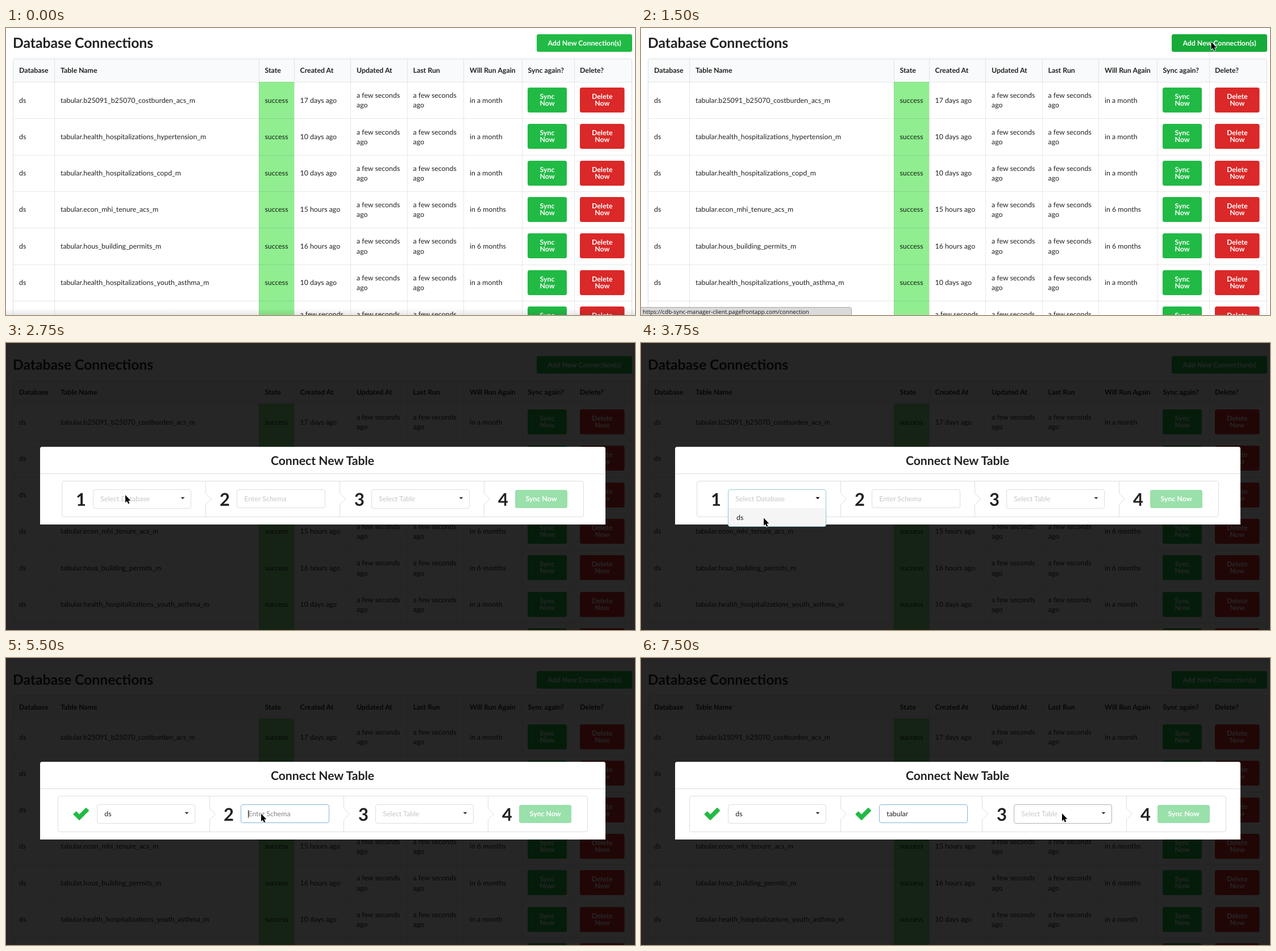
An HTML page with a canvas for the animation above (8000 ms loop, 1107 by 506 pixels).

```html
<!DOCTYPE html>
<html lang="en">
<head>
<meta charset="utf-8">
<title>Database Connections</title>
<style>
  html, body { margin: 0; width: 100%; height: 100%; overflow: hidden; background: #fff; }
  canvas { display: block; }
</style>
</head>
<body>
<canvas id="stage" width="1107" height="506"></canvas>
<script>
const W = 1107, H = 506, LOOP = 8000;
const ctx = document.getElementById('stage').getContext('2d');
ctx.textRendering = 'geometricPrecision';

const SIZE = 12.35;
const INK = 'rgba(0,0,0,.87)', PLACEHOLDER = 'rgba(191,191,191,.87)';
const BORDER = 'rgba(34,36,38,.15)', RULE = 'rgba(34,36,38,.1)', HOVER = 'rgba(34,36,38,.35)';
const GREEN = '#21ba45', RED = '#db2828', OPEN = '#96c8da', FOCUS = '#85b7d9';

const COLUMNS = [
  ['Database', 23], ['Table Name', 96], ['State', 455.5], ['Created At', 517.5], ['Updated At', 617],
  ['Last Run', 716.5], ['Will Run Again', 816], ['Sync again?', 918.5], ['Delete?', 1010]
];
const RECENT = 'a few seconds';
const ROWS = [
  ['b25091_b25070_costburden_acs_m', '17 days ago', 'in a month'],
  ['health_hospitalizations_hypertension_m', '10 days ago', 'in a month'],
  ['health_hospitalizations_copd_m', '10 days ago', 'in a month'],
  ['econ_mhi_tenure_acs_m', '15 hours ago', 'in 6 months'],
  ['hous_building_permits_m', '16 hours ago', 'in 6 months'],
  ['health_hospitalizations_youth_asthma_m', '10 days ago', 'in a month'],
  ['', RECENT, '']
];

// Each entry holds from its time until the next: [ms, ...values]
const POINTER = [
  [250, 928, 60], [500, 1004, 56], [750, 1008, 40], [1250, 1018, 23], [1500, 1003.5, 24.5],
  [2500, 238, 254], [2750, 210, 268], [3000, 216, 273], [3500, 216, 323], [3750, 216, 308.5],
  [5000, 449, 274.5], [7000, 735, 278], [7250, 741, 274]
];
const TYPED = [[0, ''], [6000, 't'], [6250, 'tab'], [6500, 'tabula'], [6750, 'tabular']];
const at = (keys, t) => keys.filter(k => k[0] <= t).pop();

function text(str, x, y, { size = SIZE, bold = false, color = INK, align = 'left', family = 'Lato' } = {}) {
  ctx.font = `${bold ? 700 : 400} ${size}px ${family}, sans-serif`;
  ctx.fillStyle = color;
  ctx.textAlign = align;
  ctx.fillText(str, x, y);
}

function box(x, y, w, h, r, fill, stroke) {
  ctx.beginPath();
  ctx.roundRect(x, y, w, h, r);
  if (fill) { ctx.fillStyle = fill; ctx.fill(); }
  if (stroke) { ctx.strokeStyle = stroke; ctx.lineWidth = 1; ctx.stroke(); }
}

function poly(points, { fill, stroke, width = 1, close = true }) {
  ctx.beginPath();
  points.forEach(([x, y]) => ctx.lineTo(x, y));
  if (close) ctx.closePath();
  ctx.lineJoin = 'round';
  if (stroke) { ctx.strokeStyle = stroke; ctx.lineWidth = width; ctx.stroke(); }
  if (fill) { ctx.fillStyle = fill; ctx.fill(); }
}

function rect(x, y, w, h, fill) {
  ctx.fillStyle = fill;
  ctx.fillRect(x, y, w, h);
}

function button(lines, x, y, w, h, color) {
  box(x, y, w, h, 3.5, color);
  const first = y + h / 2 + 4.2 - (lines.length - 1) * SIZE / 2;
  lines.forEach((line, i) =>
    text(line, x + w / 2, first + i * SIZE, { bold: true, color: '#fff', align: 'center' }));
}

function drawPage(hovered) {
  text('Database Connections', 12, 35, { size: 24.7, bold: true });
  button(['Add New Connection(s)'], 934, 11, 168, 31, hovered ? '#16ab39' : GREEN);

  box(12.5, 54.5, 1089, 600, 3.5, '#fff');
  box(13, 55, 1088, 40, [3, 3, 0, 0], '#f9fafb');
  rect(445, 95, 62, H, '#90ee90');
  for (const x of [85, 445, 507, 606, 706, 805, 908, 1000]) rect(x, 55, 1, H, RULE);
  for (const [label, x] of COLUMNS) text(label, x, 79.3, { bold: true });

  ROWS.forEach(([table, created, next], i) => {
    const top = 95 + 64.3 * i, mid = top + 36.5;
    const twoLines = x => {
      text(RECENT, x, top + 28.2);
      text('ago', x, top + 45.3);
    };
    rect(13, Math.round(top), 1088, 1, RULE);
    text('ds', 23, mid);
    text('tabular.' + table, 96, mid);
    text('success', 455.5, mid);
    if (created === RECENT) twoLines(517.5);
    else text(created, 517.5, mid);
    twoLines(617);
    twoLines(716.5);
    text(next, 816, mid);
    button(['Sync', 'Now'], 918, Math.round(top + 10), 69, 44, GREEN);
    button(['Delete', 'Now'], 1010, Math.round(top + 10), 78.5, 44, RED);
  });
  box(12.5, 54.5, 1089, 600, 3.5, null, BORDER);
}

function marker(number, field, done) {
  if (!done) return text(number, field - 30, 287, { size: 30.9, bold: true });
  const check = [[1, 11.5], [5, 7.5], [10.5, 13], [22.5, 1], [26.5, 5], [10.5, 21]];
  poly(check.map(([x, y]) => [x + field - 41.5, y + 264]), { fill: GREEN, stroke: GREEN, width: 2 });
}

function divider(x) {
  poly([[x, 244], [x, 265], [x + 10, 275], [x, 285], [x, 306]], { stroke: BORDER, close: false });
}

function dropdown(x, label, color, border, open) {
  box(x + .5, 258.5, 172, 33, open ? [3.5, 3.5, 0, 0] : 3.5, '#fff', border);
  text(label, x + 13.3, 279.3, { color });
  poly([[x + 154.5, 271.8], [x + 161.5, 271.8], [x + 158, 275.6]], { fill: open ? '#000' : 'rgba(0,0,0,.8)' });
}

function menu(x, alpha, hovered) {
  ctx.save();
  ctx.globalAlpha = alpha;
  ctx.shadowColor = BORDER;
  ctx.shadowBlur = 3;
  ctx.shadowOffsetY = 2;
  box(x + .5, 291.5, 172, 32, [0, 0, 3.5, 3.5], '#fff');
  ctx.shadowColor = 'transparent';
  box(x + .5, 291.5, 172, 32, [0, 0, 3.5, 3.5], hovered ? '#f5f5f5' : '#fafafa', OPEN);
  rect(x + 1, 291, 171, 1, hovered ? '#f5f5f5' : '#fafafa');
  text('ds', x + 15, 312.3);
  ctx.restore();
}

function drawModal(t) {
  const pickedDatabase = t >= 4500, pickedSchema = t >= 6000;
  const open = t >= 3250 && t < 4500;
  const left = 98 - 6.5 * (pickedDatabase + pickedSchema);
  const database = Math.round(left + 55 + 13 * pickedDatabase), split1 = database + 198;
  const schema = Math.round(split1 + 55.4 + 13 * pickedSchema), split2 = schema + 181;
  const table = split2 + 56, split3 = table + 198;
  const sync = split3 + 55;

  box(60, 183, 995, 137, [3.5, 3.5, 0, 0], '#fff');
  text('Connect New Table', 557, 215, { size: 21.17, bold: true, align: 'center' });
  rect(60, 230, 995, 1, BORDER);
  box(Math.floor(left) + .5, 243.5, sync + 120 - Math.floor(left), 63, 3.5, null, BORDER);
  [split1, split2, split3].forEach(x => divider(x + .5));

  marker('1', database, pickedDatabase);
  dropdown(database, pickedDatabase ? 'ds' : 'Select Database', pickedDatabase ? INK : PLACEHOLDER,
    t >= 3250 && t < 5000 ? OPEN : BORDER, open);
  if (open) menu(database, t < 3500 ? .75 : 1, t >= 3750);

  marker('2', schema, pickedSchema);
  const focused = t >= 5500, typed = at(TYPED, t)[1];
  box(schema + .5, 258.5, 155, 32, 3.5, '#fff', focused ? FOCUS : BORDER);
  text(typed || 'Enter Schema', schema + 13.3, 279.3,
    { color: typed ? INK : focused ? 'rgba(115,115,115,.87)' : PLACEHOLDER });
  if (focused && t < 7250) {
    rect(Math.round(schema + 13.3 + (typed ? ctx.measureText(typed).width : 0)), 268, 1, 14, '#222');
  }

  marker('3', table, false);
  dropdown(table, 'Select Table', PLACEHOLDER, t >= 7000 ? HOVER : BORDER, false);

  marker('4', sync, false);
  ctx.globalAlpha = .45;
  box(sync, 259, 92, 32, 3.5, GREEN);
  ctx.globalAlpha = 1;
  text('Sync Now', sync + 46, 279.3, { bold: true, color: '#fff', align: 'center' });
}

function drawStatus(t) {
  ctx.globalAlpha = t < 1500 ? .5 : 1;
  box(-4.5, 492.5, 375, 20, 3, t < 2000 ? '#dadada' : '#f4f4f4', '#a8a8a8');
  text('https://cdb-sync-manager-client.pagefrontapp.com/connection', 3, 504,
    { size: 10, color: '#111', family: '"Open Sans"' });
  ctx.globalAlpha = 1;
}

function drawPointer([, x, y]) {
  const arrow = [[0, 0], [0, 13.5], [3, 10.8], [5, 15.5], [7.3, 14.5], [5.3, 10], [9.3, 9.7]];
  poly(arrow.map(([dx, dy]) => [x + dx, y + dy]), { fill: '#000', stroke: '#fff', width: 1.8 });
}

function draw(t) {
  const modal = t >= 2000;
  rect(0, 0, W, H, '#fff');
  ctx.save();
  if (modal) ctx.translate(0, 12);
  drawPage(t >= 1250 && t < 2500);
  ctx.restore();

  if (t < 1250) {
    const shade = ctx.createLinearGradient(0, 494, 0, H);
    shade.addColorStop(0, 'rgba(0,0,0,0)');
    shade.addColorStop(1, 'rgba(0,0,0,.09)');
    rect(0, 494, W, 12, shade);
  }
  if (modal) {
    rect(0, 0, W, H, 'rgba(0,0,0,.85)');
    drawModal(t);
  }
  if (t >= 1250 && t < 2750) drawStatus(t);
  const pointer = at(POINTER, t);
  if (pointer) drawPointer(pointer);
}

function tick(now) {
  draw(now % LOOP);
  requestAnimationFrame(tick);
}
requestAnimationFrame(tick);
</script>
</body>
</html>
```
